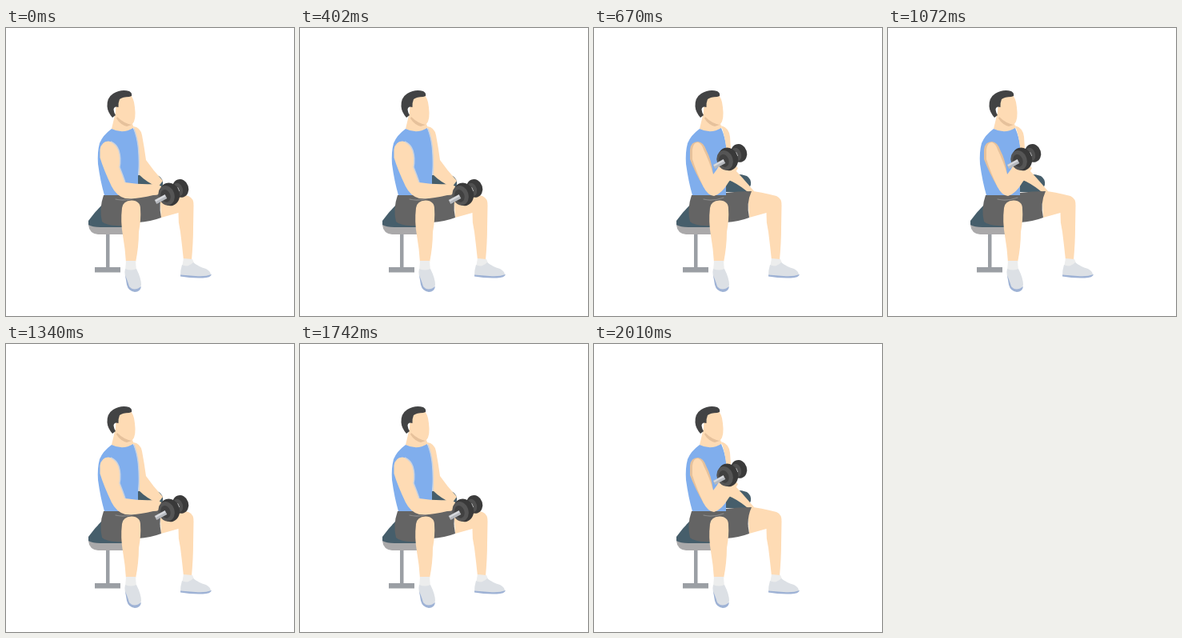
Recreate the animation shown at these times as an HTML page. Size 360 px wide and 360 px high, loop 2680 ms.

```html
<!DOCTYPE html>
<html lang="en">
<head>
<meta charset="utf-8">
<title>Seated dumbbell curl</title>
<style>
  html, body { margin: 0; height: 100%; overflow: hidden; background: #fff; }
  svg { display: block; width: 100vw; height: 100vh; }
  .skin { fill: #fedbb4; }
  .shade { fill: #e6c19b; }
  .hair { fill: #424344; }
  .shirt { fill: #80aeed; }
  .shorts { fill: #646464; }
  .navy { fill: #465e6b; }
  .steel { fill: #9b9fa4; }
  .cushion { fill: #aaa9aa; }
  .sock { fill: #eceded; }
  .shoe { fill: #dce0e5; }
  .sole { fill: #9eb2d5; }
  .line { fill: none; stroke: #8b8b8b; stroke-width: 1.2; stroke-linecap: round; }
  .edge { fill: none; stroke: #cbd3df; stroke-width: 1.5; }
</style>
</head>
<body>
<svg viewBox="0 0 360 360">
  <defs>
    <g id="dumbbell">
      <ellipse cx="218" cy="200.500" rx="10" ry="11.500" transform="rotate(-18 218 200)" fill="#3b3b3b"/>
      <ellipse cx="215" cy="202" rx="6" ry="8.500" transform="rotate(-18 215 202)" fill="#505050"/>
      <path d="M206 206L216 201.500" stroke="#d9dadc" stroke-width="5"/>
      <ellipse cx="204.500" cy="208" rx="12.500" ry="14.500" transform="rotate(-18 204 208)" fill="#393939"/>
      <ellipse cx="200.500" cy="209.500" rx="10" ry="12.500" transform="rotate(-18 200 209)" fill="#555"/>
      <ellipse cx="199.500" cy="210" rx="6" ry="8" transform="rotate(-18 199 210)" fill="#414141"/>
      <path d="M187 217.500L200 210.500" stroke="#b6b9be" stroke-width="5.500"/>
      <path d="M187 216L199 209.500" stroke="#d8dade" stroke-width="2"/>
    </g>
    <path id="shirt" class="shirt" d="M132 126Q146 133 159 125Q164 136 165.500 150Q167 170 165 186V209H123Q118 192 115 170Q114 155 117 144Q121 134 132 126Z"/>
  </defs>

  <!-- bench -->
  <path class="steel" d="M125 256h4.500v43H143v6.500H111V299h14z"/>
  <path class="cushion" d="M103 246L146 245V258H115Q104 257 103 246Z"/>
  <path class="navy" d="M120 221Q111 230 103 241V246Q108 249 118 249H147V221Z"/>

  <!-- far weight and legs -->
  <path class="navy" d="M164 184Q181 181 191 185Q197 189 196 196L192 205H164Z"/>
  <path class="skin" d="M192 203Q209 205 228 210Q235 213 234.500 222L234 250Q234 268 232 290H222Q220 271 218 255Q215 243 215.500 231L194 237Z"/>
  <path class="sock" d="M222 288L233 289L236 296L220 299Z"/>
  <path class="shoe" d="M220 296Q227 300 234 293Q240 298 250 301Q256 304 256 309Q249 312 238 311L218 310Q218 302 220 296Z"/>
  <path class="sole" d="M218 308.500L237 310Q249 311 257 308Q256 312 246 312.500Q231 313 218 310.500Z"/>
  <path class="shorts" d="M122 209L165 206Q180 204 197 204Q190 219 194 237Q181 242 165 243V246L146 247Q126 248 120 242Q116 226 122 209Z"/>
  <path class="skin" d="M145 225Q146 216 157 215.500Q168 216 168 226Q169 239 166 255Q166 273 162 293H150Q149 276 146 259Q143 242 145 225Z"/>
  <path class="line" d="M137 214Q148 217 162 212"/>
  <path class="sock" d="M150 291H162L163 304H149Z"/>
  <path class="shoe" d="M149 301Q156 304 163 301Q169 313 169 321Q168 328 160 328Q153 327 152 319Q147 308 149 301Z"/>
  <path class="sole" d="M149 309Q153 319 154 323Q160 330 169 323Q168 330 161 330Q153 329 151 321Z"/>

  <!-- head -->
  <path class="skin" d="M137 105L132 126Q146 134 160 125L158 120Q163 115 161 99Q160 87 154 82L138 88Z"/>
  <path class="shade" d="M138 113Q143 121 151 123L157 121Q147 119 139 111Z"/>
  <path class="hair" d="M133 112Q127 105 126.500 98Q126 87 134 82Q144 76 154 79Q158 81 157 85L154 86Q146 86 142 89Q140 94 140.500 99Q135 97 134.500 102Q135 106 137 109Z"/>

  <!-- lowered pose -->
  <g id="lowered">
    <use href="#shirt"/>
    <path class="skin" d="M159 123Q168 124 170 134Q173 150 175 165Q184 178 196 191L190 199Q176 193 166 183Q167 164 165.500 150Q164 136 159 123Z"/>
    <path class="edge" d="M160 126Q164 136 165.500 150Q167 168 166 183"/>
    <path class="skin" d="M117.500 152Q119 142 128 141.500Q137 142 141 153Q144 163 142 174Q146 184 149 193Q168 196 186 195Q196 196 196 203Q193 209 184 209Q165 214 149 213Q138 210 132 198Q122 177 117.500 162Z"/>
    <path class="edge" d="M131 142Q138 145 141 153Q144 163 142 174Q146 184 149 193"/>
    <use href="#dumbbell"/>
  </g>

  <!-- raised pose -->
  <g id="raised">
    <use href="#shirt"/>
    <path class="skin" d="M159 122Q169 125 170 136L171 151L165.500 152Q164 136 159 122ZM167 174L175 176Q184 185 200 204H191Q179 194 166 189Z"/>
    <path class="shade" d="M120 152Q121 142 130 142Q137 143 140 152Q147 165 149 183L137 199Q126 180 120 164Z"/>
    <path class="skin" d="M123 152Q124 143 130 143Q135 145 137 152Q144 166 149 183Q154 177 158 169Q170 165 180 175Q175 185 168 193Q160 207 150 210Q142 209 137 199Q128 180 123 164Z"/>
    <use href="#dumbbell" x="-37" y="-44"/>
  </g>
</svg>
<script>
  const HOLD = 670;
  const poses = ["lowered", "raised"].map(id => document.getElementById(id));
  const start = performance.now();

  function draw(now) {
    const active = Math.floor(Math.max(0, now - start) / HOLD) % 2;
    poses.forEach((pose, i) => { pose.style.display = i === active ? "" : "none"; });
    requestAnimationFrame(draw);
  }
  draw(start);
</script>
</body>
</html>
```
